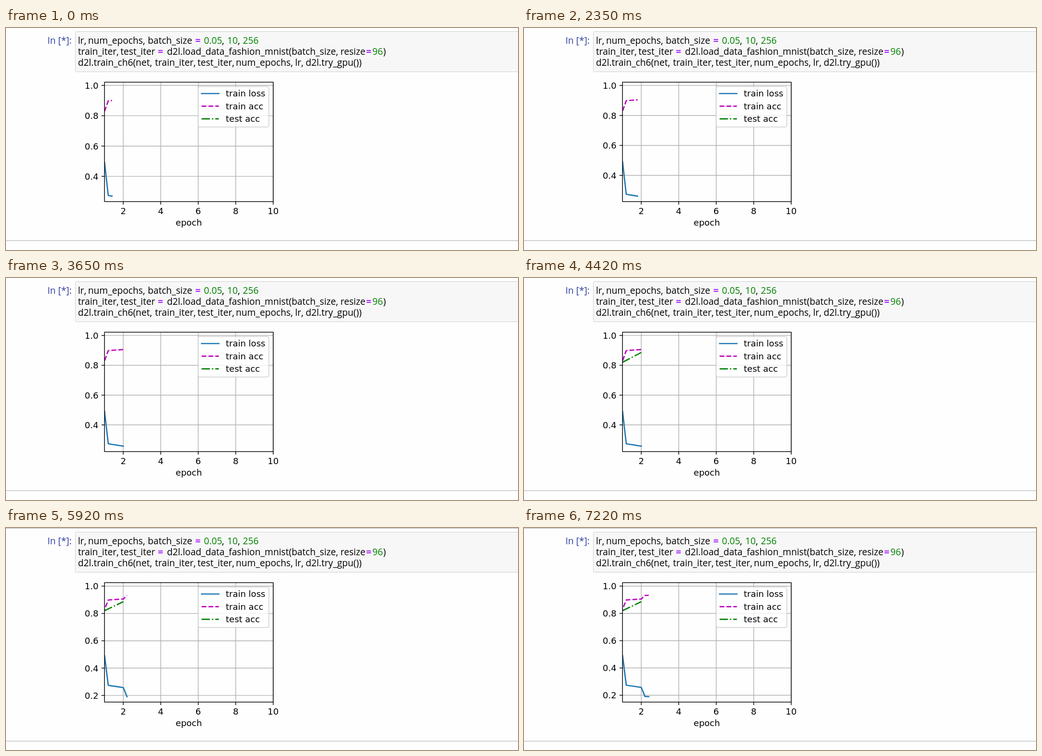
An HTML page for the animation above (8 s loop, 1067 by 464 pixels).

```html
<!DOCTYPE html>
<html lang="en">
<head>
<meta charset="utf-8">
<title>Training plot</title>
<style>
html, body { margin: 0; width: 100%; height: 100%; overflow: hidden; background: #fefefe; }
svg { display: block; width: 1067px; height: 464px; }
.code { font: 19.2px "Open Sans", "Noto Sans", sans-serif; white-space: pre; }
.plot { font: 18px "DejaVu Sans", sans-serif; }
.op { fill: #aa22ff; font-weight: bold; }
.num { fill: #008000; }
.grid { stroke: #b0b0b0; stroke-width: 1.44; }
.axis { stroke: #000; stroke-width: 1.44; fill: none; }
.loss, .acc, .test { fill: none; stroke-width: 2.7; stroke-linejoin: round; }
.loss { stroke: #1f77b4; stroke-linecap: square; }
.acc { stroke: #bf00bf; stroke-dasharray: 9.99 4.32; }
.test { stroke: #008000; stroke-dasharray: 17.28 4.32 2.7 4.32; }
</style>
</head>
<body>
<svg viewBox="0 0 1067 464">
  <clipPath id="box"><rect x="205.3" y="113.3" width="351.5" height="249.5"/></clipPath>
  <g id="page">
    <path d="M0 -.5H1067M0 444.5H1067" stroke="#ababab"/>
    <rect x="144.5" y="7.5" width="940" height="84" rx="2" fill="#f7f7f7" stroke="#cfcfcf"/>
    <g class="code" id="code"><text x="86.5" y="33" fill="#303f9f">In [*]:</text></g>
    <g class="plot">
      <g id="ticks"></g>
      <g clip-path="url(#box)">
        <polyline class="loss" id="loss"/>
        <polyline class="acc" id="acc"/>
        <polyline class="test" id="test"/>
      </g>
      <rect class="axis" x="205.3" y="113.3" width="351.5" height="249.5"/>
      <text x="381" y="413" text-anchor="middle">epoch</text>
      <rect x="400.4" y="122.3" width="147.4" height="84.5" rx="3.6" fill="#fff" fill-opacity=".8" stroke="#ccc" stroke-opacity=".8" stroke-width="1.8"/>
      <g id="legend"></g>
    </g>
  </g>
</svg>
<script>
const $ = id => document.getElementById(id);
const left = 205.3, top_ = 113.3, bottom = 362.8, margin = 11.34;

// Metrics logged every 0.2 epoch, starting at 0.2
const loss = [.9855, .75, .63, .55, .493, .274, .2695, .266, .2615, .2575, .191, .1898];
const acc = [.635, .74, .785, .81, .829, .8985, .9005, .9025, .904, .9055, .932, .9325];
const test = [[1, .82], [2, .886]];

// start ms, logged points, test curve visible, page offset
const steps = [
  [0, 7, 0, 0], [1090, 8, 0, 0], [2350, 9, 0, 0], [3650, 10, 0, 0],
  [4420, 10, 1, 0], [5920, 11, 1, 1], [7220, 12, 1, 1]
];

const code = [
  [[150, "lr,"], [171, "num_epochs,"], [295.5, "batch_size"], [394.5, "=", "op"],
   [412.5, "0.05", "num"], [450, ","], [461, "10", "num"], [483, ","], [493.5, "256", "num"]],
  [[150, "train_iter,"], [238.5, "test_iter"], [316.5, "=", "op"],
   [335.5, "d2l.load_data_fashion_mnist(batch_size,"], [697, "resize"],
   [750.5, "=", "op"], [763.5, "96", "num"], [786, ")"]],
  [[150, "d2l.train_ch6(net,"], [310.5, "train_iter,"], [399, "test_iter,"],
   [479, "num_epochs,"], [602.5, "lr,"], [624.5, "d2l.try_gpu())"]]
];
$("code").innerHTML += code.map((line, i) => line.map(([x, s, cls = ""]) =>
  `<text class="${cls}" x="${x}" y="${33 + 23 * i}">${s}</text>`).join("")).join("");

$("legend").innerHTML = ["loss", "acc", "test"].map((cls, i) => {
  const y = 137 + 26.4 * i, name = ["train loss", "train acc", "test acc"][i];
  return `<path class="${cls}" d="M407.6 ${y}h36"/><text x="458" y="${y + 6.3}">${name}</text>`;
}).join("");

const xOf = v => left + (v - 1) * 351.5 / 9;

function show([, count, tested, shift]) {
  const max = loss[0], scale = (bottom - top_ - 2 * margin) / (max - loss[count - 1]);
  const yOf = v => top_ + margin + (max - v) * scale;
  const draw = (id, pts) => $(id).setAttribute("points", pts.map(([x, y]) => [xOf(x), yOf(y)]).join(" "));
  const logged = data => data.slice(0, count).map((v, i) => [(i + 1) / 5, v]);

  let ticks = "";
  for (let v = 2; v <= 10; v += 2) {
    const x = xOf(v);
    ticks += `<path class="grid" d="M${x} ${top_}V${bottom}"/><path class="axis" d="M${x} ${bottom}v6.3"/>
      <text x="${x}" y="389" text-anchor="middle">${v}</text>`;
  }
  for (let n = 10; n > 0 && yOf(n / 10) < bottom; n -= 2) {
    const y = yOf(n / 10);
    ticks += `<path class="grid" d="M${left} ${y}H556.8"/><path class="axis" d="M${left} ${y}h-6.3"/>
      <text x="192.7" y="${y + 6.8}" text-anchor="end">${(n / 10).toFixed(1)}</text>`;
  }
  $("ticks").innerHTML = ticks;
  draw("loss", logged(loss));
  draw("acc", logged(acc));
  draw("test", tested ? test : []);
  $("page").setAttribute("transform", `translate(0 ${shift})`);
}

let current;
function tick() {
  const t = performance.now() % 8000;
  const step = steps.findLast(s => s[0] <= t);
  if (step !== current) show(current = step);
  requestAnimationFrame(tick);
}
tick();
</script>
</body>
</html>
```
